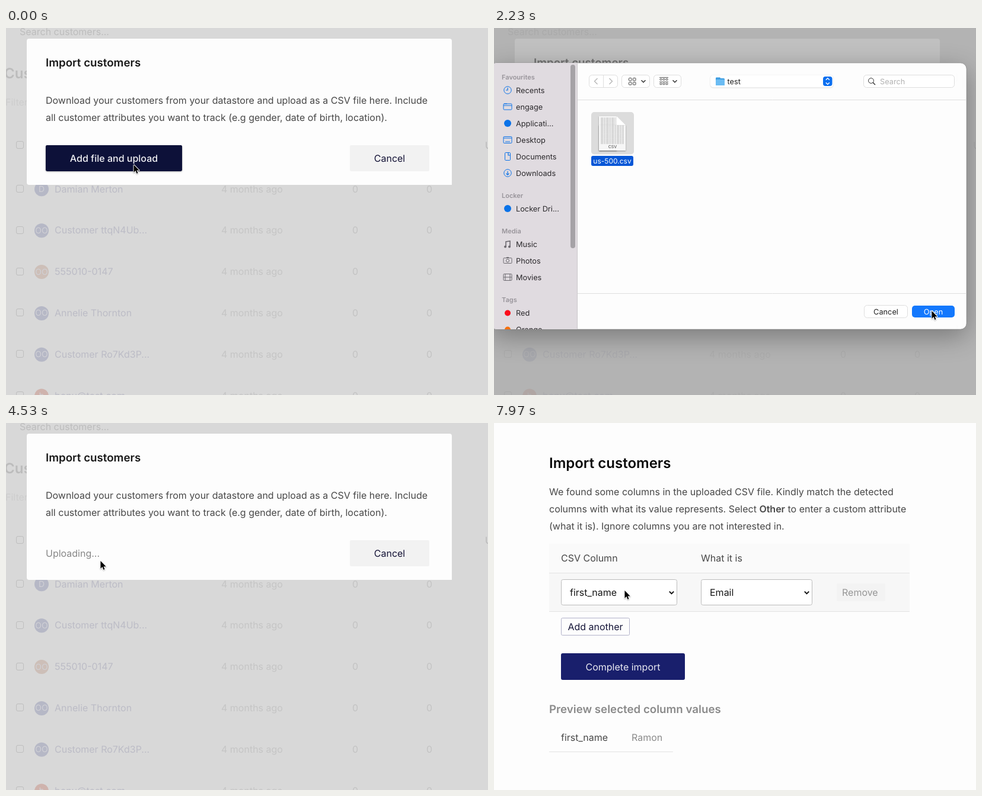
Animation of 813x620 px, one loop 8000 ms. Source, as an HTML page with a canvas:

```html
<!DOCTYPE html>
<html lang="en">
<head>
<meta charset="utf-8">
<title>Import customers</title>
<style>
  html, body { margin: 0; width: 100%; height: 100%; overflow: hidden; background: #fdfdfd; }
  canvas { display: block; width: 813px; height: 620px; }
</style>
</head>
<body>
<canvas id="stage"></canvas>
<script>
const W = 813, H = 620, LOOP = 8000;
const SHEET_OPEN = 420, SELECTED = 1130, OPEN_READY = 1270, SHEET_CLOSE = 2420, RESULT = 5990;
const BLUE = '#0a72e8', GREY = '#6d6a70', INK = '#474747', EDGE = '#dedede', PAPER = '#fdfdfd';

const canvas = document.getElementById('stage');
const ctx = canvas.getContext('2d');
const dpr = window.devicePixelRatio || 1;
canvas.width = W * dpr;
canvas.height = H * dpr;
ctx.textRendering = 'geometricPrecision';

const ease = k => k * k * (3 - 2 * k);
const clamp = k => Math.max(0, Math.min(1, k));

// The pointer glides to each place in turn and rests there.
const moves = [
  { at: 480, ms: 600, x: 213, y: 182 },
  { at: 1450, ms: 630, x: 738, y: 477 },
  { at: 2340, ms: 190, x: 710, y: 473 },
  { at: 2530, ms: 770, x: 159, y: 232 },
  { at: 5950, ms: 250, x: 186, y: 195 },
  { at: 6260, ms: 300, x: 220, y: 282 }
];

function pointerAt(t) {
  const p = { x: 215, y: 230 };
  for (const m of moves) {
    const k = ease(clamp((t - m.at) / m.ms));
    p.x += (m.x - p.x) * k;
    p.y += (m.y - p.y) * k;
  }
  return p;
}

// Text is placed by the middle of its capitals; returns the x where it ends.
function text(str, x, y, color, size = 16, weight = 400, align = 'left') {
  ctx.font = `${weight} ${size}px Inter, sans-serif`;
  ctx.textAlign = align;
  ctx.fillStyle = color;
  ctx.fillText(str, x, y + size * 0.36);
  return x + ctx.measureText(str).width;
}

const small = (str, x, y, color) => text(str, x, y, color, 12.75);

function lines(x, y, ...rows) {
  rows.forEach((row, i) => text(row, x, y + i * 28.8, INK));
}

function box(x, y, w, h, r, fill, stroke) {
  ctx.beginPath();
  ctx.roundRect(x, y, w, h, r);
  if (fill) { ctx.fillStyle = fill; ctx.fill(); }
  if (stroke) { ctx.strokeStyle = stroke; ctx.lineWidth = 1; ctx.stroke(); }
}

function button(label, x, y, w, h, { fill = '#fff', edge, color = '#222', size = 16, weight = 400, r = 2 }) {
  box(x, y, w, h, r, fill, edge);
  text(label, x + w / 2, y + h / 2 + 0.5, color, size, weight, 'center');
}

function circle(x, y, r, fill, stroke) {
  box(x - r, y - r, 2 * r, 2 * r, r, fill, stroke);
}

function path(color, width, ...points) {
  ctx.beginPath();
  for (const [x, y] of points) ctx.lineTo(x, y);
  ctx.strokeStyle = color;
  ctx.lineWidth = width;
  ctx.stroke();
}

const rule = (y, x0, x1, color = '#e3e3e3') => path(color, 1, [x0, y], [x1, y]);

// An open arrowhead whose tip lies s from its centre in direction dx, dy.
function chevron(x, y, dx, dy, s, color, width = 1.5) {
  const a = dx * s / 2, b = dy * s / 2, u = dy * s, v = dx * s;
  path(color, width, [x - a - u, y - b - v], [x + a, y + b], [x - a + u, y - b + v]);
}

function shadow(color, blur, dy, draw) {
  ctx.shadowColor = color;
  ctx.shadowBlur = blur * dpr;
  ctx.shadowOffsetY = dy * dpr;
  draw();
  ctx.shadowColor = 'transparent';
}

function drawList() {
  ctx.fillStyle = '#d8d8d8';
  ctx.fillRect(0, 0, W, H);
  text('Search customers...', 23, 6, '#bdbdbd');
  text('Customers', -3, 76, '#bcbcbc', 24, 600);
  text('Filter', -1, 125, '#cdcdcd');
  text('U', 808, 198, '#b8b8b8');
  const rowY = i => 202 + i * 69.85;
  const check = y => box(17.5, Math.round(y) - 6.5, 12, 12, 2.5, null, '#bebebe');
  check(198);
  const names = ['Damian Merton', 'Customer ttqN4Ub...', '555010-0147',
    'Annelie Thornton', 'Customer Ro7Kd3P...', 'benu@test.com'];
  names.forEach((name, i) => {
    const y = rowY(i + 1), mark = { 0: 'D', 5: 'b' }[i] || 'OO';
    check(y);
    circle(60, y + 0.5, 12, { 2: '#cdbfb8', 5: '#cfb3ad' }[i] || '#b6b8c6');
    text(mark, 60, y, '#d0d0d5', 14, 400, 'center');
    text(name, 82, y, '#bcbcc6');
    text('4 months ago', 363, y, '#c5c5c5');
    for (const x of [584, 709]) text('0', x, y, '#c3c3c3');
  });
}

function drawModal(uploading) {
  box(35, 18, 717, 247, [4, 4, 0, 4], PAPER);
  text('Import customers', 67, 58.5, '#171717', 18.72, 600);
  lines(67, 122.5,
    'Download your customers from your datastore and upload as a CSV file here. Include',
    'all customer attributes you want to track (e.g gender, date of birth, location).');
  if (uploading) {
    text('Uploading...', 67, 220.5, '#868686');
  } else {
    shadow('rgba(0,0,0,.4)', 3, 1, () => box(67, 198, 230, 43.5, 3, '#0d1139'));
    button('Add file and upload', 67, 198, 230, 44, { fill: '#0d1139', color: '#f2f2f6', weight: 500, r: 3 });
  }
  button('Cancel', 580, 198, 134, 44, { fill: '#f2f2f2', color: '#141336' });
}

// Sidebar icons, centred on 0,0
const frameIcon = (c, w = 7, h = 5.5) => box(-w, -h, 2 * w, 2 * h, 1.2, null, c);
const icons = {
  clock(c) { circle(0, 0, 6.2, null, c); path(c, 1.2, [0, -4], [0, 0], [-3, 0]); },
  folder(c) { frameIcon(c, 7, 5); rule(-2, -7, 7, c); rule(-5, -6, -1, c); },
  mark(c) { circle(0, 0, 6, c); },
  desktop(c) { frameIcon(c); rule(-3, -7, 7, c); rule(3, -4, 4, c); },
  page(c) { frameIcon(c, 4.5, 6.5); path(c, 1.2, [1, -6], [1, -2], [4, -2]); },
  down(c) { circle(0, 0, 6.2, null, c); path(c, 1.2, [0, -3], [0, 3]); chevron(0, 2, 0, 1, 2.5, c, 1.2); },
  note(c) {
    path(c, 1.6, [-3, 5], [-3, -4], [4, -5], [4, 4]);
    for (const side of [-1, 1]) circle(side * 3.5 - 0.5, 4.5, 2, c);
  },
  camera(c) { frameIcon(c, 7, 4.5); circle(0, 0, 2.6, null, c); rule(-5.5, -2, 2, c); },
  film(c) {
    frameIcon(c);
    rule(0, -7, 7, c);
    for (const x of [-4, 4]) path(c, 1, [x, -5], [x, 5]);
  },
  tag(c) { circle(0, 0.5, 5, c); }
};

const sections = {
  Favourites: { color: BLUE, items: ['clock Recents', 'folder engage', 'mark Applicati...',
    'desktop Desktop', 'page Documents', 'down Downloads'] },
  Locker: { color: BLUE, items: ['mark Locker Dri...'] },
  Media: { color: GREY, items: ['note Music', 'camera Photos', 'film Movies'] },
  Tags: { items: ['tag Red', 'tag Orange'] }
};

function drawSidebar() {
  ctx.fillStyle = '#e0dbe0';
  ctx.fillRect(-10, 59, 150, 450);
  path('#cbc8cb', 1, [140.5, 59], [140.5, 509]);
  let y = 83;
  for (const [title, { color, items }] of Object.entries(sections)) {
    text(title, 13, y, '#98949a', 11, 600);
    y += 22;
    for (const item of items) {
      const [icon, ...words] = item.split(' '), label = words.join(' ');
      ctx.save();
      ctx.translate(23, y);
      icons[icon](color || { Red: '#fb0d1b', Orange: '#f8700b' }[label]);
      ctx.restore();
      small(label, 37, y, '#2b292c');
      y += 28;
    }
    y += 10;
  }
  box(129, 62, 8, 310, 4, '#a5a2a6');
}

function drawToolbar() {
  const y = 90, field = (x, w) => box(x + 0.5, y - 10.5, w, 21, 5, '#fff', EDGE);
  field(160, 48);
  path(EDGE, 1, [184.5, 80], [184.5, 100]);
  chevron(172, y, -1, 0, 5, '#b4b4b4', 1.3);
  chevron(197, y, 1, 0, 5, '#b4b4b4', 1.3);

  field(215, 47);
  for (let i = 0; i < 4; i++) box(227.5 + i % 2 * 7, 84.5 + (i >> 1) * 7, 4.5, 4.5, 0.8, null, '#444');
  field(269, 46);
  for (let i = 0; i < 6; i++) box(280 + i % 3 * 5, 85.5 + (i > 2) * 7.5, 3, 2.6, 0.5, null, '#555');
  for (const dy of [-6.5, 1]) rule(y + dy, 279, 294, '#555');
  for (const x of [252, 305]) chevron(x, y, 0, 1, 3.5, '#333');

  shadow('rgba(0,0,0,.2)', 2, 0.5, () => box(365, 79.5, 207, 21, 5, '#fff'));
  box(374, 83.5, 8, 6, 1.2, '#3b9be0');
  box(374, 85, 15, 12, 1.5, '#3f9fe3');
  box(374, 87, 15, 10, 1.5, '#6bbcf3');
  small('test', 393.5, y, '#222');
  box(555, 82, 15.5, 16, 4, '#0b6ff0');
  for (const side of [-1, 1]) chevron(562.8, y + side * 3.7, 0, side, 3, '#fff', 1.4);

  field(623, 153);
  circle(636, 89, 4.4, null, '#333');
  path('#333', 1.5, [639, 92], [643, 96]);
  small('Search', 651, y + 0.5, '#b2b2b2');
}

function drawFile(selected) {
  const left = 177, top = 149, right = 222, bottom = 207, fold = 15;
  if (selected) box(164, 142, 72, 71.5, 5, '#dcdcdc');
  shadow('rgba(0,0,0,.35)', 2, 1, () => {
    box(left, top, right - left - fold, bottom - top, 0, '#f6f6f6');
    box(left, top + fold, right - left, bottom - top - fold, 0, '#f6f6f6');
  });
  ctx.setLineDash([4.5, 1, 2.5, 1]);
  for (let y = top + 3; y < bottom - 11; y += 1.8) {
    rule(y, left + 3, y < top + fold ? right - fold - 2 : right - 3, '#c2c2c2');
  }
  ctx.setLineDash([]);
  path('#cfcfcf', 0.8, [right - fold, top], [right - fold, top + fold], [right, top + fold], [right - fold, top]);
  ctx.fillStyle = '#fff';
  ctx.fill();
  text('CSV', 200, 200, '#606060', 7, 500, 'center');
  button('us-500.csv', 164, 216, 71, 17, {
    fill: selected ? '#0757d7' : PAPER, color: selected ? '#fff' : '#222', size: 12, r: 3
  });
}

function drawSheet(t) {
  const outline = [-5, 59, 802, 450, 10], size = 12.75, r = 5;
  ctx.globalAlpha = clamp((t - SHEET_OPEN) / 120);
  ctx.fillStyle = 'rgba(160,160,160,.65)';
  ctx.fillRect(0, 0, W, H);
  shadow('rgba(0,0,0,.33)', 44, 12, () => box(...outline, PAPER, 'rgba(120,120,120,.5)'));
  ctx.save();
  ctx.beginPath();
  ctx.roundRect(...outline);
  ctx.clip();
  drawSidebar();
  for (const y of [121.5, 448.5]) rule(y, 141, W, EDGE);
  drawToolbar();
  drawFile(t >= SELECTED);
  button('Cancel', 624.5, 468.5, 73, 21, { edge: EDGE, size, r });
  if (t >= OPEN_READY) button('Open', 705, 469, 72, 20, { fill: '#1378fd', color: '#fff', size, r });
  else button('Open', 704.5, 468.5, 73, 21, { edge: '#ebebeb', color: '#bababa', size, r });
  ctx.restore();
  ctx.globalAlpha = 1;
}

function drawSelect(label, x, w) {
  box(x + 0.5, 264.5, w - 1, 43, 3, '#fff', '#bcbcbc');
  text(label, x + 15, 286.5, '#161616');
  chevron(x + w - 9.5, 286.5, 0, 1, 3.7, '#111', 2);
}

function drawResult(hover) {
  const left = 93, right = 701, muted = '#8a8a8a';
  ctx.fillStyle = PAPER;
  ctx.fillRect(0, 0, W, H);
  text('Import customers', left, 67, '#080808', 24, 600);
  lines(left, 116.5,
    'We found some columns in the uploaded CSV file. Kindly match the detected', '',
    '(what it is). Ignore columns you are not interested in.');
  let x = text('columns with what its value represents. Select ', left, 145.5, INK);
  x = text('Other', x, 145.5, INK, 16, 600);
  text(' to enter a custom attribute', x, 145.5, INK);

  box(left, 204, right - left, 49, 0, '#fafafa');
  if (hover) box(left, 254, right - left, 64, 0, '#f7f7f7');
  for (const y of [253.5, 318.5]) rule(y, left, right);
  text('CSV Column', 113, 228.5, INK);
  text('What it is', 349, 228.5, INK);
  drawSelect('first_name', 113, 196);
  drawSelect('Email', 349, 188);
  box(578, 271, 82, 30, 2, '#f3f3f3');
  text('Remove', 587, 286.5, '#969696');
  button('Add another', 113.5, 329.5, 115, 29, { fill: PAPER, edge: '#b2b2c9', color: '#151538' });
  button('Complete import', 113, 389, 209, 45, { fill: '#191f6c', color: '#ebebf3', r: 3 });

  text('Preview selected column values', left, 483.5, muted, 18.72, 600);
  text('first_name', 113, 531.5, INK);
  text('Ramon', 232, 531.5, muted);
  rule(555.5, left, 302);
}

function drawPointer({ x, y }) {
  const shape = [[0, 0], [0, 13], [3, 10], [5, 15], [7, 14], [5, 9.5], [9.2, 9.5]];
  ctx.save();
  ctx.translate(x + 0.5, y + 1);
  ctx.lineJoin = 'round';
  shadow('rgba(0,0,0,.3)', 2, 1, () => path('#fff', 1.8, ...shape, shape[0]));
  ctx.fillStyle = '#000';
  ctx.fill();
  ctx.restore();
}

function frame() {
  const t = performance.now() % LOOP, pointer = pointerAt(t);
  ctx.setTransform(dpr, 0, 0, dpr, 0, 0);
  if (t >= RESULT) {
    drawResult(pointer.y > 254);
  } else {
    drawList();
    drawModal(t >= SHEET_CLOSE);
    if (t >= SHEET_OPEN && t < SHEET_CLOSE) drawSheet(t);
  }
  drawPointer(pointer);
  requestAnimationFrame(frame);
}
frame();
</script>
</body>
</html>
```
